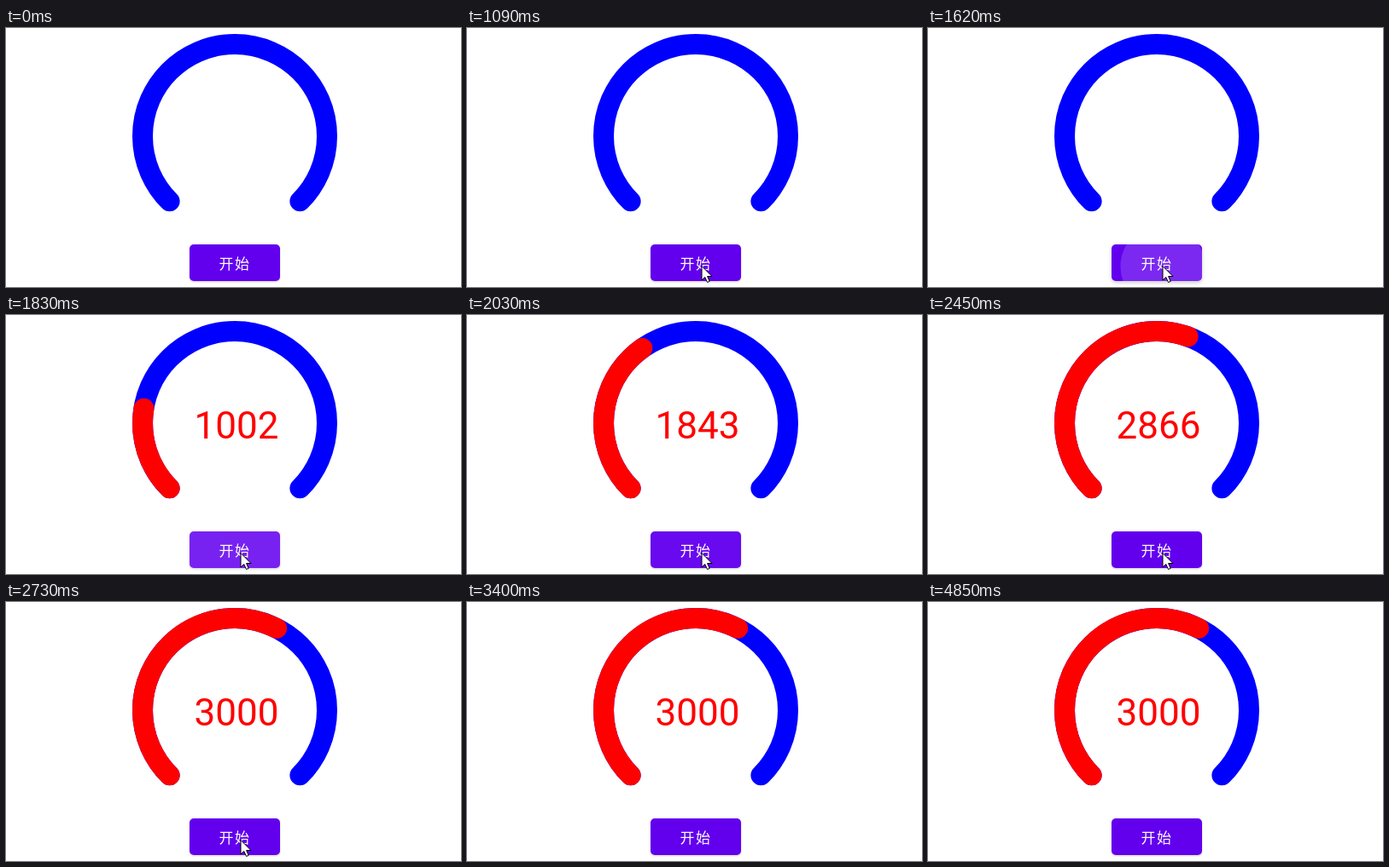
Animation of 533 by 304 pixels, one loop 5.45 s. Source, as an HTML page:

```html
<!DOCTYPE html>
<html lang="zh">
<head>
<meta charset="utf-8">
<style>
html, body { margin: 0; width: 100%; height: 100%; overflow: hidden; background: #fff; }
svg { display: block; width: 533px; height: 304px; }
.ring { fill: none; stroke-width: 24; stroke-linecap: round; }
#count { font: 44px Roboto, "Liberation Sans", sans-serif; fill: #f00; text-anchor: middle; }
#label { font: 17px "Noto Sans CJK SC", "Noto Sans CJK", sans-serif; letter-spacing: 1.5px; fill: #fff; }
#button { fill: #6200ee; }
</style>
</head>
<body>
<svg viewBox="0 0 533 304">
  <clipPath id="clip"><rect x="215" y="254" width="106" height="43" rx="5"/></clipPath>
  <path class="ring" stroke="#00f" d="M191.63 203.37A108 108 0 1 1 344.37 203.37"/>
  <path class="ring" id="progress" stroke="#f00" pathLength="5000" d="M191.63 203.37A108 108 0 1 1 344.37 203.37"/>
  <text id="count" x="270" y="144.5"></text>
  <rect id="button" x="215" y="254" width="106" height="43" rx="5"/>
  <circle id="ripple" cx="275" cy="280" fill="#fff" clip-path="url(#clip)"/>
  <text id="label" x="249.5" y="282.5">开始</text>
  <path id="cursor" d="M0 0V16.5L3.8 13L6.5 19L9.2 17.9L6.6 12H12Z" fill="#fff" stroke="#000" stroke-linejoin="round"/>
</svg>
<script>
const LOOP = 5450, MAX = 5000, GOAL = 3000;
const $ = id => document.getElementById(id);
const progress = $('progress'), count = $('count'), button = $('button'),
      ripple = $('ripple'), cursor = $('cursor');

const part = (t, from, to) => Math.min(1, Math.max(0, (t - from) / (to - from)));
const easeOut = p => 1 - (1 - p) ** 2;

// Pointer stops: time, x, y
const stops = [
  [0, 298, 310], [610, 298, 310], [1080, 275, 279.5], [3140, 275, 279.5],
  [3400, 297, 306], [4600, 297, 306], [4720, 294.5, 297.5], [4850, 297, 306], [LOOP, 298, 310]
];

function pointer(t) {
  const i = stops.findIndex(s => s[0] > t);
  const [t0, x0, y0] = stops[i - 1], [t1, x1, y1] = stops[i];
  const raw = part(t, t0, t1), p = t1 === 1080 ? easeOut(raw) : raw;
  return [x0 + (x1 - x0) * p, y0 + (y1 - y0) * p];
}

function draw(t) {
  const value = GOAL * easeOut(part(t, 1642.4, 2667.4));
  progress.style.visibility = count.style.visibility = value > 0 ? 'visible' : 'hidden';
  progress.setAttribute('stroke-dasharray', `${value} ${MAX * 2}`);
  count.textContent = Math.floor(value);

  const press = part(t, 1540, 1620) * (1 - part(t, 1780, 2100));
  ripple.setAttribute('r', 20 + 50 * easeOut(part(t, 1540, 1765)));
  ripple.setAttribute('opacity', 0.16 * press);
  button.style.filter = `drop-shadow(0 ${1 + press}px ${1 + press}px rgba(0,0,0,.2))`;

  cursor.setAttribute('transform', `translate(${pointer(t)})`);
}

const start = performance.now();
function tick() {
  draw((performance.now() - start) % LOOP);
  requestAnimationFrame(tick);
}
tick();
</script>
</body>
</html>
```
